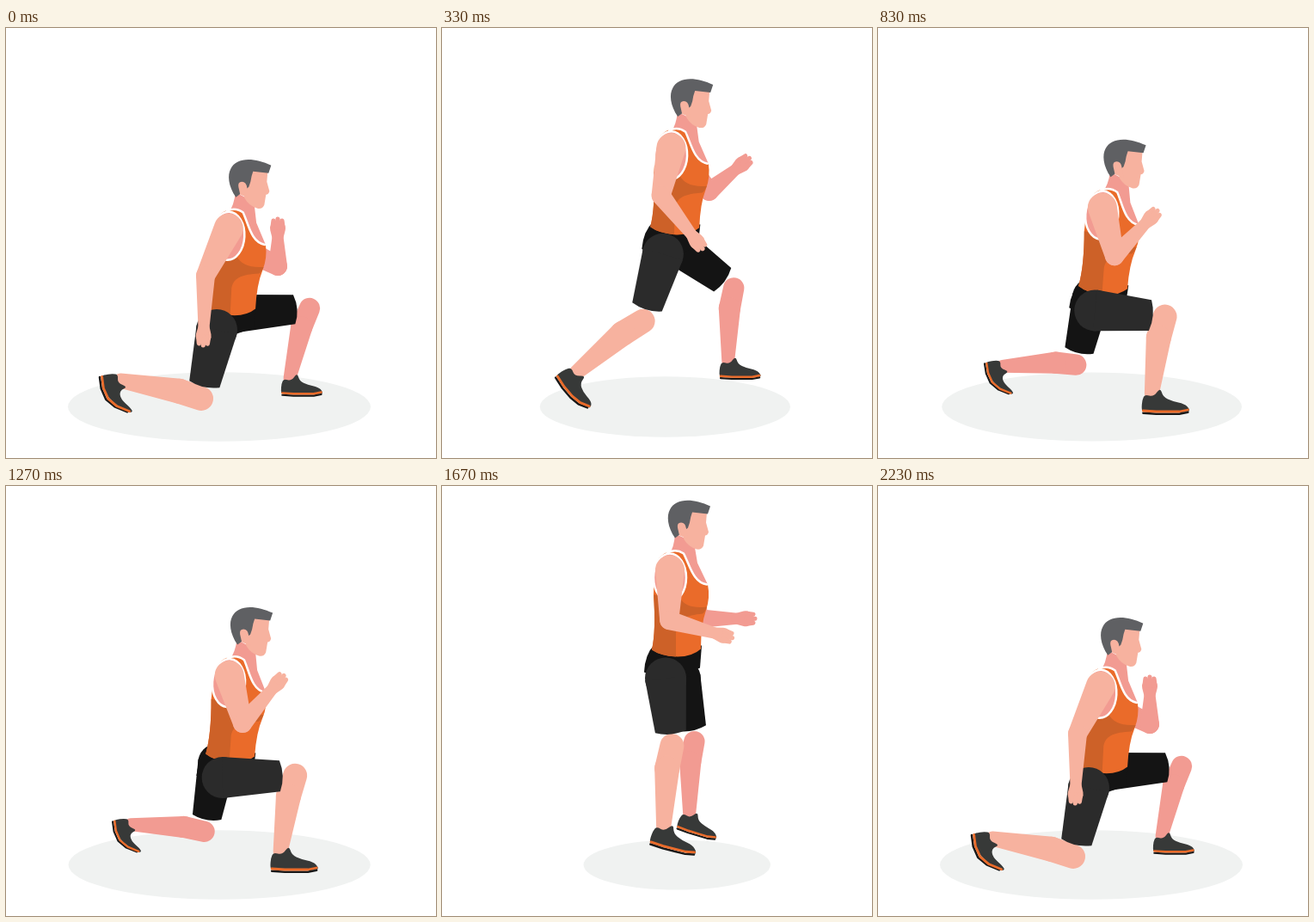
Write an HTML page with a canvas that moves like this. It is 500x500 px and loops after 2330 ms.

```html
<!DOCTYPE html>
<html lang="en">
<head>
<meta charset="utf-8">
<title>Alternating lunges</title>
<style>
html, body { margin: 0; width: 100%; height: 100%; overflow: hidden; background: #fff; }
canvas { display: block; }
</style>
</head>
<body>
<canvas id="stage" width="500" height="500"></canvas>
<script>
const c = document.getElementById('stage').getContext('2d');
const SKIN = '#f7b29f', FAR_SKIN = '#f29b92', SHIRT = '#ea6b2a', SHADE = '#cd6128';
const SHORTS = '#2b2b2b', FAR_SHORTS = '#141414', SHOE = '#373938', HAIR = '#5f6063';

// -1: near leg back, 0: standing, 1: near leg forward
const KEYS = [-1, -.64, -.34, 0, .34, .74, 1];
// hip shift, lean | near knee, ankle, foot angle | far knee, ankle, foot angle
// near elbow, wrist | far elbow, wrist
const POSES = [
  [-11, 2.9, 227, 431, 133, 410, 78, 353, 326, 330, 407, 0, 232, 288, 230, 348, 316, 277, 316, 243],
  [-4, 2.9, 230, 384, 135, 405, 70, 343, 321, 330, 406, 0, 247, 241, 264, 295, 316, 232, 334, 196],
  [-2, 2.1, 233, 344, 153, 401, 55, 340, 303, 333, 388, 0, 254, 198, 288, 245, 311, 193, 341, 166],
  [0, 0, 266, 302, 255, 397, 15, 295, 297, 290, 382, 16, 264, 156, 317, 171, 300, 154, 343, 154],
  [-4, 2.4, 320, 314, 320, 406, 0, 243, 343, 164, 390, 55, 269, 199, 321, 193, 275, 200, 298, 236],
  [-10, 4.3, 331, 334, 318, 425, 0, 230, 382, 145, 393, 75, 275, 254, 312, 220, 266, 250, 272, 286],
  [-13, 3.8, 339, 338, 320, 425, 0, 231, 413, 145, 394, 79, 275, 288, 308, 246, 260, 284, 264, 325]
];

const easeInOut = u => u * u * (3 - 2 * u);
const easeDown = u => easeInOut(1 - (1 - u) ** 1.6);

function phase(n) {
  if (n < 16) return easeInOut(n / 16) - 1;
  if (n < 32) return easeDown((n - 16) / 16);
  if (n < 35) return 1;
  if (n < 51) return 1 - easeInOut((n - 35) / 16);
  return -easeDown(Math.min(1, (n - 51) / 16));
}

// monotone cubic interpolation between the poses
const slope = (j, k) => (POSES[j + 1][k] - POSES[j][k]) / (KEYS[j + 1] - KEYS[j]);
function tangent(j, k) {
  if (j === 0) return slope(0, k);
  if (j === KEYS.length - 1) return slope(j - 1, k);
  const a = slope(j - 1, k), b = slope(j, k);
  return a * b > 0 ? 2 * a * b / (a + b) : 0;
}
function poseAt(p) {
  let i = 0;
  while (i < KEYS.length - 2 && p > KEYS[i + 1]) i++;
  const h = KEYS[i + 1] - KEYS[i], u = (p - KEYS[i]) / h, e = easeInOut(u);
  return POSES[i].map((v, k) => v + (POSES[i + 1][k] - v) * e
    + h * u * (1 - u) * ((1 - u) * tangent(i, k) - u * tangent(i + 1, k)));
}

function fill(d, color) {
  c.fillStyle = color;
  c.fill(new Path2D(d));
}
function line(d, color, width) {
  c.strokeStyle = color;
  c.lineWidth = width;
  c.stroke(new Path2D(d));
}
function disc([x, y], r, color) {
  c.fillStyle = color;
  c.beginPath();
  c.arc(x, y, r, 0, 7);
  c.fill();
}
// two circles and everything between them
function taper(a, r1, b, r2, color) {
  const dx = b[0] - a[0], dy = b[1] - a[1], t = Math.atan2(dy, dx);
  const f = Math.acos((r1 - r2) / Math.hypot(dx, dy));
  c.fillStyle = color;
  c.beginPath();
  c.arc(a[0], a[1], r1, t + f, t - f + 2 * Math.PI);
  c.arc(b[0], b[1], r2, t - f, t + f);
  c.fill();
}
// point at fraction u of a bone, moved sideways by v pixels
function along(a, b, u, v = 0) {
  const dx = b[0] - a[0], dy = b[1] - a[1], d = Math.hypot(dx, dy);
  return [a[0] + dx * u - dy / d * v, a[1] + dy * u + dx / d * v];
}

function arm(shoulder, elbow, wrist, r, color) {
  taper(shoulder, r, elbow, 11, color);
  taper(elbow, 11, wrist, 6.5, color);
  const d = Math.hypot(wrist[0] - elbow[0], wrist[1] - elbow[1]);
  const tip = (len, v) => along(elbow, wrist, 1 + len / d, v);
  taper(wrist, 6.5, tip(10, 0), 9, color);
  for (const v of [-5, 0, 5]) taper(tip(12, v), 3.5, tip(21 - Math.abs(v) * .4, v), 2.6, color);
}

function shoe([x, y], deg, size) {
  const bend = Math.max(0, (deg - 40) / 40);
  const at = ([px, py]) => [px * (1 - .12 * bend), py - .02 * bend * Math.max(0, px - 8) ** 2];
  const sole = dy => 'M' + [[-10, 20], [5, 21], [20, 21], [32, 21], [42, 19]]
    .map(([px, py]) => at([px, py + dy])).join('L');
  const upper = [[-11, 7], [-8, 1], [2, 4], [10, -7], [13, 4], [24, 9], [38, 12], [44, 18],
    [43, 22], [20, 22], [-10, 22], [-12, 18]].map(at);
  c.save();
  c.translate(x, y);
  c.rotate(deg * Math.PI / 180);
  c.scale(size, size);
  c.lineCap = c.lineJoin = 'round';
  const mid = (a, b) => [(a[0] + b[0]) / 2, (a[1] + b[1]) / 2];
  let d = 'M' + mid(upper[upper.length - 1], upper[0]);
  upper.forEach((q, i) => d += 'Q' + q + ' ' + mid(q, upper[(i + 1) % upper.length]));
  line(sole(2.7), '#181818', 2.5);
  fill(d, SHOE);
  line(sole(0), SHIRT, 2.8);
  c.restore();
}

function shin(knee, ankle, deg, size, color) {
  const calf = along(knee, ankle, .28, 3);
  taper(knee, 14 * size, calf, 14.5 * size, color);
  taper(calf, 14.5 * size, ankle, 8.5 * size, color);
  shoe(ankle, deg, size);
}

function thigh(hip, knee, r, hem, color) {
  disc(hip, r, color);
  const at = (u, v) => along(hip, knee, u, v);
  fill(`M${at(0, r)}L${at(.79, hem)}Q${at(.87, 0)} ${at(.79, -hem)}L${at(0, -r)}Z`, color);
}

function inTorso(m, draw) {
  c.save();
  c.setTransform(m);
  draw();
  c.restore();
}

function pelvis() {
  fill('M247 183Q236 194 235 215L262 226L300 210L302 184Z', FAR_SHORTS);
}

function torso() {
  c.lineCap = 'round';
  fill('M271 54L293 64L297 88L309 113L285 112L264 78Q270 70 271 54Z', FAR_SKIN);
  fill('M263 75Q272 71 281 77C288 90 292 111 309 113Q312 128 307 143Q301 160 301 188' +
    'Q291 197 274 197Q254 196 244 189Q249 166 246 125L247 95Q251 79 263 75Z', SHIRT);
  fill('M276 128Q284 142 308 139Q306 145 303 147C284 149 272 153 272 168L272 197' +
    'Q254 196 244 189Q249 166 246 125Z', SHADE);
  line('M262 76Q272 71 281 77C288 90 292 111 308 113', '#fff', 2.5);
  c.beginPath();
  c.ellipse(265, 105, 19, 28, 0, 0, 7);
  c.fillStyle = FAR_SKIN;
  c.fill();
  c.strokeStyle = '#fff';
  c.lineWidth = 2.5;
  c.stroke();
}

function head() {
  fill('M288 26L308 29L307 41L310 52Q309 56 306 56L304 68Q302 73 296 72Q286 69 281 60L279 46Z', SKIN);
  fill('M271 59C262 46 261 33 265 26C271 13 291 12 312 22L309 31L291 29Q289 34 288 41L286 47L279 53Z', HAIR);
  fill('M274 47Q273 41 278 41Q283 41 284 48L286 60L276 56Z', SKIN);
}

function draw(p) {
  const depth = Math.abs(p), drop = 137 * depth;
  const [shift, lean, ...j] = poseAt(p);
  const [nKneeX, nKneeY, nAnkX, nAnkY, nFoot, fKneeX, fKneeY, fAnkX, fAnkY, fFoot,
    nElX, nElY, nWrX, nWrY, fElX, fElY, fWrX, fWrY] = j;
  const m = new DOMMatrix().translate(shift + 272, drop + 190).rotate(lean).translate(-272, -190);
  const onTorso = (x, y) => { const q = m.transformPoint({ x, y }); return [q.x, q.y]; };
  const nHip = [260 + shift + 4 * p, 222 + drop - 8 * depth];
  const fHip = [279 + shift - 24 * Math.max(0, p), 222 + drop - 27 * depth];
  const nKnee = [nKneeX, nKneeY], fKnee = [fKneeX, fKneeY];

  c.fillStyle = '#fff';
  c.fillRect(0, 0, 500, 500);
  const rx = 176 - 69 * (1 - depth) ** 2.15;
  c.fillStyle = '#f0f2f1';
  c.beginPath();
  c.ellipse(314 - .375 * rx, 440.5, rx, 11 + rx / 6, 0, 0, 7);
  c.fill();

  arm(onTorso(290, 122), [fElX, fElY], [fWrX, fWrY], 13, FAR_SKIN);
  shin(fKnee, [fAnkX, fAnkY], fFoot, .87, FAR_SKIN);
  thigh(fHip, fKnee, 22, 17, FAR_SHORTS);
  inTorso(m, pelvis);
  inTorso(m, torso);
  // the head follows the lean without tilting
  const [hx, hy] = onTorso(285, 45);
  inTorso(new DOMMatrix().translate(hx - 285, hy - 45), head);
  shin(nKnee, [nAnkX, nAnkY], nFoot, 1, SKIN);
  thigh(nHip, nKnee, 24, 18, SHORTS);
  arm(onTorso(265, 96), [nElX, nElY], [nWrX, nWrY], 17, SKIN);
}

// the motion runs in 70 steps of a thirtieth of a second
const start = performance.now();
function tick() {
  const t = Math.max(0, performance.now() - start) % 2330;
  draw(phase(Math.min(69, Math.floor(t * .03 + .15))));
  requestAnimationFrame(tick);
}
tick();
</script>
</body>
</html>
```
